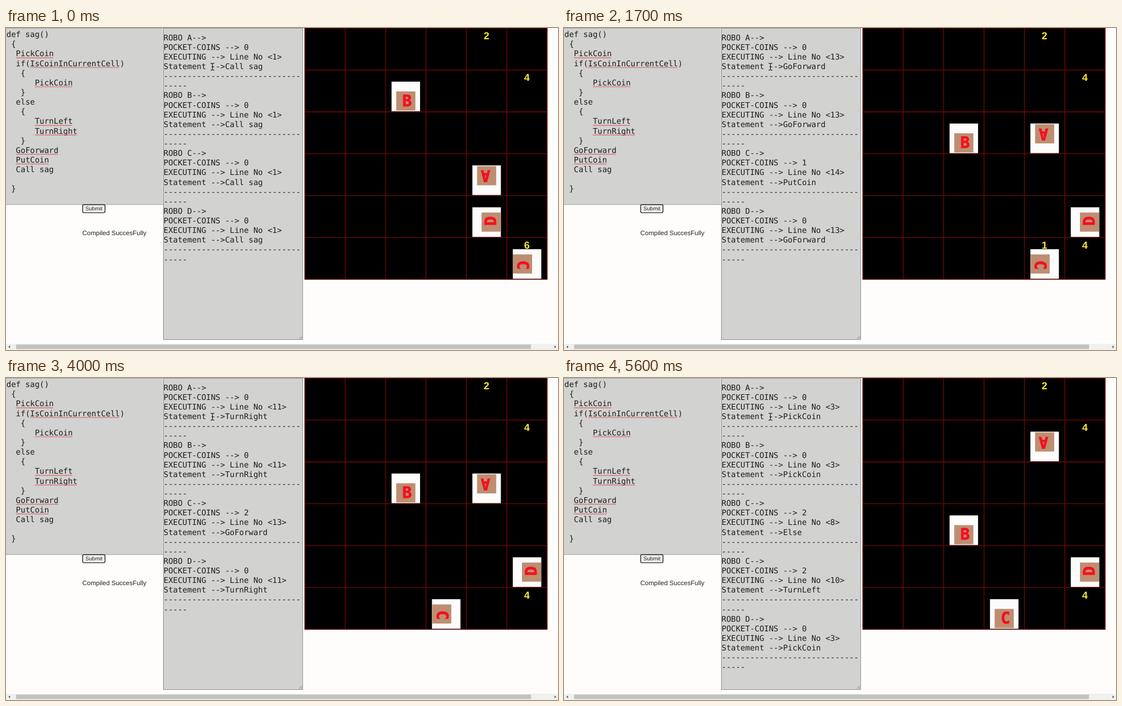
Write an HTML page that moves like this. It is 980x572 px and loops after 6000 ms.

```html
<!DOCTYPE html>
<html lang="en">
<head>
<meta charset="utf-8">
<title>Robot coin program</title>
<style>
html, body { margin: 0; width: 100%; height: 100%; overflow: hidden; background: #fefdfc; }
svg { display: block; width: 980px; height: 572px; }
text { white-space: pre; text-rendering: geometricPrecision; }
.code { font: 13.95px "DejaVu Sans Mono", monospace; fill: #1c1c1c; }
.ui { font-family: "Liberation Sans", Arial, sans-serif; fill: #222; }
.coin { font: bold 18px "Liberation Sans", Arial, sans-serif; fill: #f7e72c; text-anchor: middle; }
.tag { font: bold 28px "DejaVu Sans Mono", monospace; fill: #f5101c; stroke: #f5101c; stroke-width: .8; text-anchor: middle; }
.wave { fill: none; stroke: #dc5058; stroke-width: 1.1; opacity: .8; }
</style>
</head>
<body>
<svg viewBox="0 0 980 572">
  <defs>
    <clipPath id="pane"><rect x="279" y="0" width="248" height="552.5"/></clipPath>
    <path id="beam" fill="none" d="M363.3 62.5Q366 62.5 366.5 64Q367 62.5 369.7 62.5M366.5 64V73.5M363.3 75Q366 75 366.5 73.5Q367 75 369.7 75M365 69H368"/>
  </defs>
  <rect width="980" height="572" fill="#fefdfc"/>

  <rect width="278.5" height="314" fill="#d2d2d0"/>
  <path d="M0 .5H278M0 313.7H279" stroke="#a3a3a1"/>
  <g id="program"></g>
  <rect x="136.2" y="313.8" width="39.5" height="14.3" rx="2" fill="#f3f3f2" stroke="#222" stroke-width="1.4"/>
  <text class="ui" x="156" y="324.3" font-size="9.7" text-anchor="middle">Submit</text>
  <text class="ui" x="135.5" y="368" font-size="11.5">Compiled SuccesFully</text>

  <rect x="279.5" y=".5" width="247.2" height="553" fill="#d2d2d0" stroke="#8d8d8b"/>
  <g id="log" clip-path="url(#pane)"></g>
  <g id="bar">
    <rect x="516" y="1" width="10.5" height="542" fill="#ececeb"/>
    <rect id="thumb" x="517" y="13" width="8.5" fill="#bdbdbb"/>
    <path d="M518.8 8.5L521.2 5.5L523.6 8.5ZM518.8 534.5L521.2 537.5L523.6 534.5Z" fill="#555"/>
  </g>
  <path d="M520.5 552L525.5 547M523.5 552L525.5 550" stroke="#777" stroke-width=".9"/>
  <use href="#beam" stroke="#e0e0de" stroke-width="3"/>
  <use href="#beam" stroke="#222" stroke-width="1.3"/>

  <rect x="530" y="0" width="430.7" height="446.7" fill="#000"/>
  <path id="grid" fill="none" stroke="#780707" stroke-width="1.3"/>
  <g id="board"></g>

  <rect y="561" width="980" height="11" fill="#f0f0ef"/>
  <rect x="18" y="562.3" width="914" height="8" fill="#c1c1c0"/>
  <path d="M7.2 564L4.2 566.4L7.2 568.8ZM973.8 564L976.8 566.4L973.8 568.8Z" fill="#555"/>
</svg>
<script>
const $ = id => document.getElementById(id);
const CHAR = 8.4, LINE = 17.13, CELL_W = 71.75, CELL_H = 74.4, LEFT = 530.4;

const escape = s => s.replace(/</g, '&lt;').replace(/>/g, '&gt;');
const label = (cls, x, y, s) => `<text class="${cls}" x="${x}" y="${y}">${escape(s)}</text>`;

// [indent, text, misspelt part]
const program = [
  [0, 'def sag()'], [1, '{'], [2, 'PickCoin', 'PickCoin'],
  [2, 'if(IsCoinInCurrentCell)', 'IsCoinInCurrentCell'], [3, '{'],
  [6, 'PickCoin', 'PickCoin'], [3, '}'], [2, 'else'], [3, '{'],
  [6, 'TurnLeft', 'TurnLeft'], [6, 'TurnRight', 'TurnRight'], [3, '}'],
  [2, 'GoForward', 'GoForward'], [2, 'PutCoin', 'PutCoin'], [2, 'Call sag'],
  [0, ''], [1, '}']
];

function wave(x, y, width) {
  let d = `M${x} ${y}`;
  for (let i = 1; i * 1.7 <= width; i++) d += `L${x + i * 1.7} ${y + (i % 2) * 1.1}`;
  return `<path class="wave" d="${d}"/>`;
}

$('program').innerHTML = program.map(([indent, s, bad], i) => {
  const x = 0.8 + indent * CHAR, y = 16.2 + i * LINE;
  const mark = bad ? wave(x + s.indexOf(bad) * CHAR, y + 2, bad.length * CHAR) : '';
  return label('code', x, y, s) + mark;
}).join('');

let lines = '';
for (let i = 0; i <= 6; i++) {
  lines += `M${LEFT + i * CELL_W} 0V446.6M${LEFT} ${i * CELL_H + .2}H${LEFT + 6 * CELL_W}`;
}
$('grid').setAttribute('d', lines);

const statements = {
  1: 'Call sag', 3: 'PickCoin', 4: 'If', 6: 'PickCoin', 8: 'Else', 10: 'TurnLeft',
  11: 'TurnRight', 13: 'GoForward', 14: 'PutCoin'
};

// Log entries: robot, line, then coins held. Poses: column, row, quarter turns.
const turning = 'A8 A10 B8 B10 ';
const steps = [
  { t: 0, log: 'A1 B1 C1 D1', A: [4, 3, 2], B: [2, 1, 0], C: [5, 5, 1], D: [4, 4, 3], corner: 6, drop: 0 },
  { t: 300, log: 'A3 B3 C3:1 D3', corner: 5 },
  { t: 900, log: turning + 'C4:1 C6:2 D8 D10', A: [4, 3, 1], B: [2, 1, 3], D: [4, 4, 2], corner: 4 },
  { t: 1300, log: 'A11 B11 C13:2 D11', A: [4, 3, 2], B: [2, 1, 0], C: [4, 5, 1], D: [4, 4, 3] },
  { t: 1700, log: 'A13 B13 C14:1 D13', A: [4, 2, 2], B: [2, 2, 0], D: [5, 4, 3], drop: 1 },
  { t: 2200, log: 'A14 B14 C1:1 D14' },
  { t: 2600, log: 'A1 B1 C3:2 D1', drop: 0 },
  { t: 3100, log: 'A3 B3 C8:2 C10:2 D3', C: [4, 5, 0] },
  { t: 3600, log: turning + 'C11:2 D8 D10', A: [4, 2, 1], B: [2, 2, 3], C: [4, 5, 1], D: [5, 4, 2] },
  { t: 4000, log: 'A11 B11 C13:2 D11', A: [4, 2, 2], B: [2, 2, 0], C: [3, 5, 1], D: [5, 4, 3] },
  { t: 4400, log: 'A13 B13 C14:1 D13', A: [4, 1, 2], B: [2, 3, 0], drop: 1 },
  { t: 4900, log: 'A14 B14 C1:1 D14' },
  { t: 5200, log: 'A1 B1 C3:2 D1' },
  { t: 5300, drop: 0 },
  { t: 5600, log: 'A3 B3 C8:2 C10:2 D3', C: [3, 5, 0] }
];
const states = [];
steps.forEach((s, i) => states.push({ ...states[i - 1], ...s }));

function drawLog(text) {
  const entries = text.split(' ');
  const long = entries.length > 5;
  const dashes = long ? 28 : 29;
  const rows = entries.flatMap(entry => {
    const [line, coins = 0] = entry.slice(1).split(':');
    return [
      `ROBO ${entry[0]}-->`, `POCKET-COINS --> ${coins}`, `EXECUTING --> Line No <${line}>`,
      `Statement -->${statements[line]}`, '-'.repeat(dashes), '-'.repeat(34 - dashes)
    ];
  });
  $('log').innerHTML = rows.map((s, i) => label('code', 279.8, 21.6 + i * LINE, s)).join('');
  $('bar').style.display = long ? '' : 'none';
  $('thumb').setAttribute('height', 334 * 8 / entries.length);
}

function robot(name, [col, row, turn]) {
  const x = LEFT + col * CELL_W + 35.9, y = row * CELL_H + 47.2;
  return `<g transform="translate(${x} ${y})">
    <rect x="-25.3" y="-26.3" width="50.6" height="52.6" fill="#fdfcfb"/>
    <g transform="rotate(${turn * 90})">
      <rect x="-17" y="-9" width="34" height="34" fill="#bd8e72"/>
      ${label('tag', 2, 16.9, name)}
    </g></g>`;
}

const coin = (n, col, row) =>
  n ? label('coin', LEFT + (col + .5) * CELL_W - .3, row * CELL_H + 19.8, String(n)) : '';

function draw(s) {
  drawLog(s.log);
  $('board').innerHTML = ['A', 'B', 'C', 'D'].map(n => robot(n, s[n])).join('') +
    coin(2, 4, 0) + coin(4, 5, 1) + coin(s.corner, 5, 5) + coin(s.drop, s.C[0], 5);
}

let shown;
function tick() {
  const t = performance.now() % 6000;
  const state = states.filter(s => s.t <= t).pop();
  if (state !== shown) draw(shown = state);
  requestAnimationFrame(tick);
}
tick();
</script>
</body>
</html>
```
